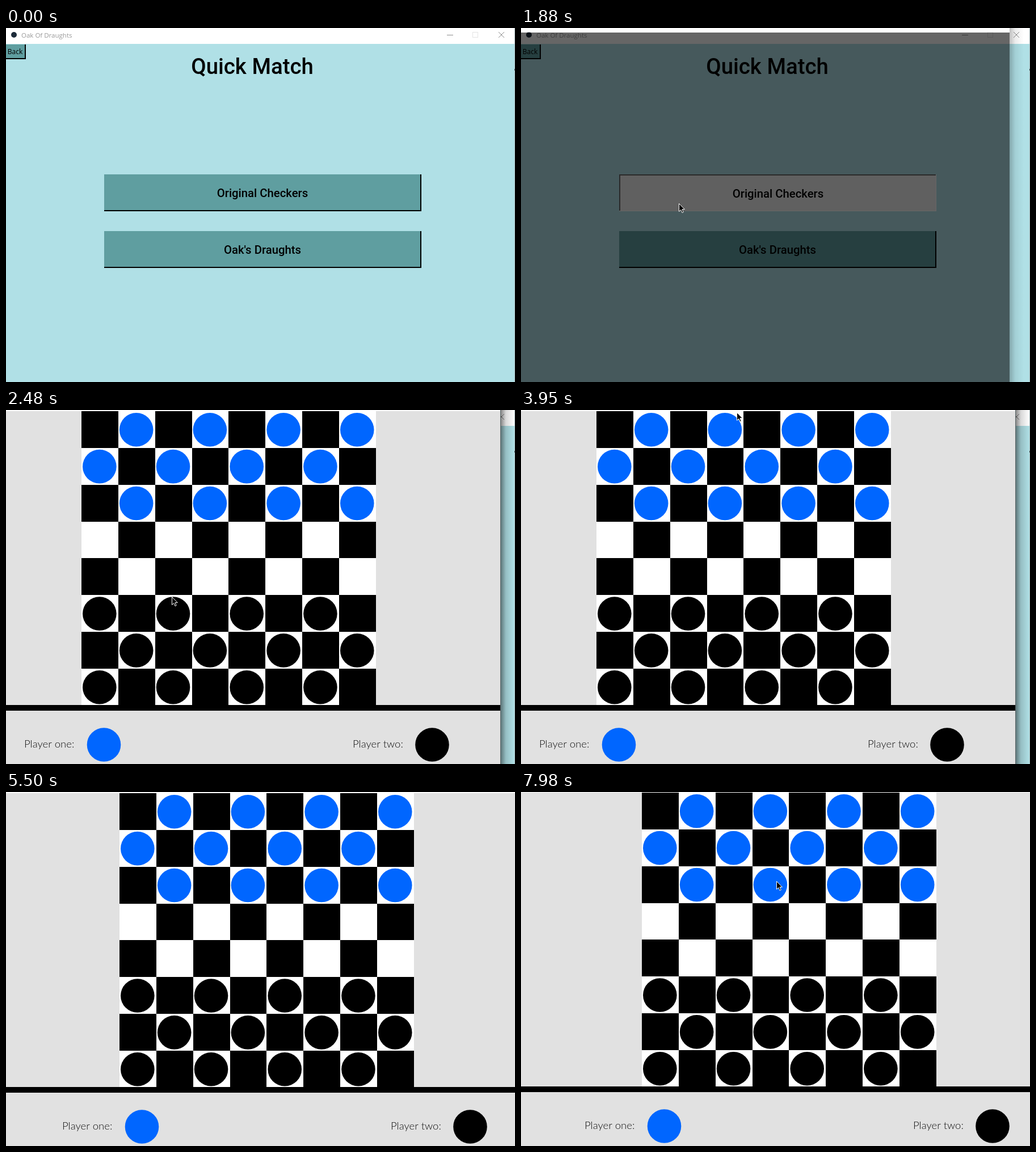
An HTML page with a canvas that plays this animation: 897x624 px, repeating every 8 s.

```html
<!DOCTYPE html>
<html lang="en">
<head>
<meta charset="utf-8">
<title>Checkers</title>
<style>
  html, body { margin: 0; width: 100%; height: 100%; overflow: hidden; }
  canvas { display: block; }
</style>
</head>
<body>
<canvas id="stage" width="897" height="624"></canvas>
<script>
const ctx = document.getElementById('stage').getContext('2d');
const W = 897, H = 624, LOOP = 8000, CELL = 64.85;
const BLUE = '#0066ff', TEAL = '#5f9ea0';

// Stepped movements: start, end, number of steps, evenly spaced waypoints
const pointerMoves = [
  [1000, 1780, 11, [250, 622], [240, 480], [250, 360], [268, 297]],
  [1880, 2480, 9, [278, 309], [303, 353], [310, 352], [300, 338], [292, 329]],
  [2840, 2960, 3, [315, 270], [340, 195], [362, 123]],
  [3020],
  [3950, 4330, 6, [380, 4], [345, 30], [270, 46], [180, 40], [85, 24], [7, 8]],
  [4410],
  [6750, 7520, 11, [91, 17], [140, 110], [200, 200], [275, 223], [345, 195], [375, 170]],
  [7600, 7980, 6, [390, 168], [428, 152], [461, 147], [456, 151], [450, 157]]
];
const windowMoves = [
  [0, 1, 2, [0, 2], [0, 2]],
  [4870, 5500, 9, [8, 3], [31, 5], [49, 5], [61, 4], [67, 2]],
  [5640, 5641, 2, [69, 1], [69, 1]],
  [5810, 5960, 3, [71, 1], [73, 0], [75, 0]],
  [6420, 6421, 2, [78, 1], [78, 1]],
  [6590, 6591, 2, [80, 1], [80, 1]]
];

function locate(moves, t) {
  const move = moves.filter(m => m[0] <= t).pop();
  if (!move || move.length < 4) return null;
  const [start, end, steps, ...points] = move;
  const step = Math.min(steps - 1, Math.floor((t - start) / (end - start) * (steps - 1) + 0.14));
  const place = step / (steps - 1) * (points.length - 1);
  const i = Math.min(points.length - 2, Math.floor(place));
  return points[i].map((v, k) => Math.round(v + (points[i + 1][k] - v) * (place - i)));
}

function rect(x, y, w, h, color) {
  ctx.fillStyle = color;
  ctx.fillRect(x, y, w, h);
}

function disc(x, y, r, color) {
  ctx.fillStyle = color;
  ctx.beginPath();
  ctx.arc(x, y, r, 0, 7);
  ctx.fill();
}

function text(str, x, y, font, color = '#000', align = 'left') {
  ctx.font = font + ', sans-serif';
  ctx.fillStyle = color;
  ctx.textAlign = align;
  ctx.fillText(str, x, y);
}

function button(x, y, w, h, label, font, textY, state = '') {
  const sunken = state === 'pressed';
  rect(x, y, w, h, sunken ? '#fff' : '#000');
  if (sunken) rect(x, y, w - 1, h - 1, '#696969');
  const inset = sunken ? 2 : 0;
  rect(x + inset, y + inset, w - 2 + inset / 2 - inset, h - 2 + inset / 2 - inset, state ? '#f0f0f0' : TEAL);
  const shift = sunken ? 1 : 0;
  text(label, x + w / 2 + shift - 0.5, textY + shift, font, '#000', 'center');
}

function titleBar(active) {
  rect(0, 0, W, 28, '#fff');
  disc(14, 12, 5, '#1d2b3a');
  text('Oak Of Draughts', 27, 17, '11.5px "Open Sans"', active ? '#000' : '#999');
  const ink = active ? '#000' : '#8c8c8c';
  rect(777, 12, 11, 1, ink);
  ctx.lineWidth = 1;
  ctx.strokeStyle = active ? '#ccc' : '#e4e4e4';
  ctx.strokeRect(822.5, 7.5, 9, 9);
  ctx.strokeStyle = ink;
  ctx.beginPath();
  ctx.moveTo(868, 7); ctx.lineTo(878, 17);
  ctx.moveTo(878, 7); ctx.lineTo(868, 17);
  ctx.stroke();
}

function menu(active, state) {
  rect(0, 0, W, H, '#b0e0e6');
  titleBar(active);
  button(-2, 29, 37, 26, 'Back', '12px "Open Sans"', 46);
  text('Quick Match', 434, 81, '500 38.3px Roboto', '#000', 'center');
  button(173, 258, 559, 65, 'Original Checkers', '500 20.3px Roboto', 298, state);
  button(173, 358, 559, 65, "Oak's Draughts", '500 20.3px Roboto', 398);
  rect(896, 0, 1, H, active ? '#5c7478' : '#a3b4b6');
  rect(896, 72, 1, 3, '#333');
}

function shadow(right, strength) {
  if (right >= W) return;
  const fade = ctx.createLinearGradient(right, 0, right + 25, 0);
  fade.addColorStop(0, `rgba(0,0,0,${strength})`);
  fade.addColorStop(0.4, `rgba(0,0,0,${strength * 0.3})`);
  fade.addColorStop(1, 'rgba(0,0,0,0)');
  rect(right, 0, 25, H, fade);
}

function board() {
  const edge = i => Math.round(i * CELL);
  rect(133, 0, edge(8), edge(8), '#fff');
  for (let row = 0; row < 8; row++) {
    for (let col = 0; col < 8; col++) {
      if ((row + col) % 2 === 0) {
        rect(133 + edge(col), edge(row), edge(col + 1) - edge(col), edge(row + 1) - edge(row), '#000');
      } else if (row < 3 || row > 4) {
        disc(164.8 + col * CELL, 32.8 + row * CELL, 29.8, row < 3 ? BLUE : '#000');
      }
    }
  }
}

function game(x, y) {
  rect(0, 0, 871 + x, y, '#fdfdfd');
  rect(0, y, 871 + x, H, '#e1e1e1');
  ctx.save();
  ctx.translate(x, y);
  board();
  rect(-x, 518, 871 + x, 10, '#000');
  text('Player one:', 32, 593, '300 18.5px Lato', '#111');
  text('Player two:', 611, 593, '300 18.5px Lato', '#111');
  disc(172.5, 588, 29.8, BLUE);
  disc(751, 588, 29.8, '#000');
  ctx.restore();
  rect(871 + x, 0, 1, H, '#5a6668');
}

function opening(t) {
  const k = [1960, 2020, 2100].filter(at => t >= at).length;
  const right = [861, 868, 871, 871][k], top = [8, 4, 2, 2][k];
  shadow(right, [0.25, 0.4, 0.5, 0.5][k]);
  ctx.globalAlpha = [0.6, 0.86, 0.968, 1][k];
  rect(0, 0, right, top, '#fdfdfd');
  rect(0, top, right, H, '#000');
  ctx.globalAlpha = 1;
}

function pointer([x, y]) {
  const shape = new Path2D('M.5 .5V14.5L3.7 11.5L6 16.6L8.2 15.6L6 10.6H10.3Z');
  ctx.save();
  ctx.translate(x, y);
  ctx.fillStyle = '#000';
  ctx.strokeStyle = '#fff';
  ctx.lineWidth = 1;
  ctx.fill(shape);
  ctx.stroke(shape);
  ctx.restore();
}

function draw(t) {
  const cursor = locate(pointerMoves, t);
  if (t < 2260) {
    const hover = cursor && cursor[1] < 323;
    menu(t >= 1700 && t < 1880, t >= 1780 ? 'pressed' : hover ? 'hover' : '');
    if (t >= 1880) opening(t);
  } else {
    const [x, y] = locate(windowMoves, t);
    menu(false, '');
    shadow(871 + x, 0.5);
    game(x, y);
  }
  if (cursor) pointer(cursor);
}

function tick() {
  draw(performance.now() % LOOP);
  requestAnimationFrame(tick);
}
tick();
</script>
</body>
</html>
```
